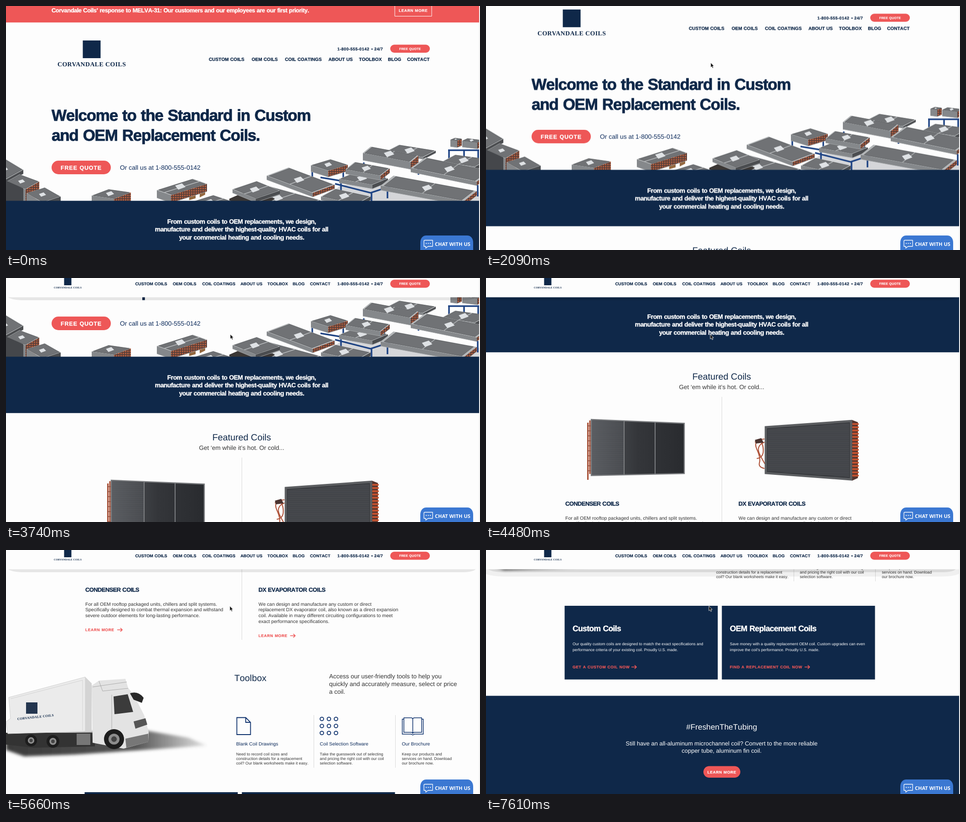
Animation of 1040x538 px, one loop 8000 ms. Source, as an HTML page:

```html
<!DOCTYPE html>
<html lang="en">
<head>
<meta charset="utf-8">
<title>Coil shop scroll</title>
<style>
:root { --navy: #0f2849; --red: #ee5757; --paper: #fdfdfd; }
html, body { margin: 0; width: 100%; height: 100%; overflow: hidden; background: var(--paper); }
svg { display: block; width: 1040px; height: 538px; }
text { font: 10.48px "Liberation Sans", Arial, sans-serif; font-kerning: none; fill: #333; text-rendering: geometricPrecision; white-space: pre; }
.mid { text-anchor: middle; }
.b { font-weight: 700; color: var(--navy); fill: currentColor; stroke: currentColor; stroke-width: .025em; letter-spacing: -.036em; word-spacing: .05em; }
.h1 { font-size: 35px; }
.h2 { font-size: 19.8px; fill: var(--navy); }
.h3 { font-size: 12.8px; }
.h4 { font-size: 17.5px; }
.lead { font-size: 13.5px; }
.call { font-size: 13.9px; fill: #0b2a5b; }
.intro { font-size: 13.8px; }
.note { font-size: 12.9px; }
.nav { font-size: 10.1px; letter-spacing: 0; }
.nav.small { font-size: 9.1px; }
.tel { font-size: 9px; letter-spacing: .43px; }
.btn { font-size: 8.5px; letter-spacing: .6px; }
.btn.tiny { font-size: 7px; letter-spacing: .18px; }
.btn.big { font-size: 12.5px; letter-spacing: .8px; }
.tool { font-size: 10.3px; fill: #0b2a5b; }
.fine { font-size: 8.73px; }
.card { font-size: 8.6px; }
.tag { font-size: 17.3px; }
.cta { font-size: 12.93px; }
.brand { font: 700 13.8px "Liberation Serif", Times, serif; letter-spacing: .033em; fill: var(--navy); }
.chat { font: 700 11px "Open Sans", sans-serif; }
.white { color: #fff; fill: #fff; }
.red { color: var(--red); fill: var(--red); }
.navy { fill: var(--navy); }
.line { fill: none; stroke: #d9d9d9; }
.icon { fill: none; stroke: #0b2f6b; stroke-width: 1.8; }
.arrow { fill: none; stroke: var(--red); stroke-width: 1.6; }
#page, #sticky, #glow, #cursor { animation: 8s step-end infinite; }
#page { animation-name: scroll; }
#sticky { animation-name: stick; }
#glow { animation-name: glow; }
#cursor { animation-name: point; }
@keyframes scroll {
  0% { transform: translateY(0); }
  5.6% { transform: translateY(-4px); }
  7.45% { transform: translateY(-22px); }
  9.2% { transform: translateY(-42px); }
  11.1% { transform: translateY(-54px); }
  20.45% { transform: translateY(-60px); }
  22.3% { transform: translateY(-67px); }
  26.1% { transform: translateY(-68.3px); }
  27.95% { transform: translateY(-83.5px); }
  31.7% { transform: translateY(-85.5px); }
  37.3% { transform: translateY(-87.5px); }
  39.2% { transform: translateY(-130px); }
  41.1% { transform: translateY(-205px); }
  46.7% { transform: translateY(-256px); }
  50.3% { transform: translateY(-300px); }
  55.95% { transform: translateY(-390px); }
  57.8% { transform: translateY(-480px); }
  61.45% { transform: translateY(-552px); }
  65.2% { transform: translateY(-625px); }
  68.8% { transform: translateY(-690px); }
  70.7% { transform: translateY(-800px); }
  76.3% { transform: translateY(-880px); }
  80.1% { transform: translateY(-925px); }
  81.95% { transform: translateY(-939px); }
  85.7% { transform: translateY(-985px); }
  87.6% { transform: translateY(-1090px); }
  93.2% { transform: translateY(-1170px); }
  95.1%, 100% { transform: translateY(-1211px); }
}
@keyframes stick { 0% { visibility: hidden; } 41.1%, 100% { visibility: visible; } }
@keyframes glow { 0% { opacity: 0; } 93.2%, 100% { opacity: 1; } }
@keyframes point {
  0% { transform: translate(493px, 125px); opacity: 0; }
  5.6% { transform: translate(493px, 125px); opacity: 1; }
  37.3% { transform: translate(492px, 124px); opacity: 1; }
  61.45% { transform: translate(491px, 123.5px); opacity: 1; }
  81.95%, 100% { transform: translate(489px, 123.5px); opacity: 1; }
}
</style>
</head>
<body>
<svg viewBox="0 0 1040 538">
  <defs>
    <pattern id="fins" width="4" height="2.6" patternUnits="userSpaceOnUse">
      <path d="M0 1H4" stroke="#686b70" stroke-width=".8"/>
    </pattern>
    <pattern id="tubes" width="5" height="5" patternUnits="userSpaceOnUse">
      <rect width="5" height="5" fill="#5b403a"/><circle cx="2.5" cy="2.5" r="1.7" fill="#b8603f"/>
    </pattern>
    <linearGradient id="road"><stop offset="0" stop-color="#3a3a3a"/><stop offset=".65" stop-color="#555"/><stop offset="1" stop-color="#555" stop-opacity=".15"/></linearGradient>
    <linearGradient id="panel"><stop offset="0" stop-color="#55585c"/><stop offset=".5" stop-color="#34363a"/><stop offset="1" stop-color="#292b2f"/></linearGradient>
    <filter id="soft" x="-10%" y="-50%" width="120%" height="200%"><feGaussianBlur stdDeviation="3"/></filter>
  </defs>
  <g id="page"></g>
  <g id="sticky"></g>
  <g id="chat">
    <path d="M909 540V522Q909 513 914 509 917 506 922 506H1012Q1017 506 1020 509 1025 513 1025 522V540Z" fill="#3b78d2"/>
    <path d="M919 516.5H936V530H926L921 534V530H917V518.5Q917 516.5 919 516.5Z" fill="none" stroke="#fff" stroke-width="1.3" stroke-linejoin="round"/>
    <path d="M921 523.5h2m2.5 0h2m2.5 0h2" stroke="#fff" stroke-width="2"/>
    <text class="chat white" x="941" y="529">CHAT WITH US</text>
  </g>
  <path id="cursor" d="M0 0V10.5L2.4 8.4 4.2 12.2 6 11.3 4.3 7.7H7.4Z" fill="#111" stroke="#fff" stroke-width=".8"/>
  <path d="M1038 0H1040V538H1038Z" fill="#fcfcfc"/>
  <path d="M1038.5 0V538" stroke="#e6e6e6"/>
</svg>
<script>
const NAME = 'CORVANDALE COILS', PHONE = '1-800-555-0142';
const MENU = ['CUSTOM COILS', 'OEM COILS', 'COIL COATINGS', 'ABOUT US', 'TOOLBOX', 'BLOG', 'CONTACT'];

const put = (id, ...parts) => document.getElementById(id).innerHTML = parts.join('');
const at = (y, ...parts) => `<g transform="translate(0 ${y})">${parts.join('')}</g>`;
const path = (d, attrs = '') => `<path d="${d}" ${attrs}/>`;
const fill = (d, color) => path(d, `fill="${color}"`);
const box = (x, y, w, h, cls, r = 0) => `<rect x="${x}" y="${y}" width="${w}" height="${h}" rx="${r}" class="${cls}"/>`;
const disc = (x, y, r, color) => `<circle cx="${x}" cy="${y}" r="${r}" fill="${color}"/>`;
const text = (cls, x, y, str, lead = 0) => str.split('|')
  .map((s, i) => `<text class="${cls}" x="${x}" y="${y + i * lead}">${s}</text>`).join('');
const pill = (x, y, w, h, size, base, label) =>
  box(x, y, w, h, 'red', h / 2) + text(`b btn ${size} mid white`, x + w / 2, base, label);
const link = (x, y, label, tip) =>
  text('b btn red', x, y, label) + path(`M${tip - 11} ${y - 3}H${tip}m-4 -3.8l4 3.8 -4 3.8`, 'class="arrow"');
const menu = (cls, y, xs) => xs.map((x, i) => text('b nav ' + cls, x, y, MENU[i])).join('');
const contact = y => text('b tel', 727, y + 3.5, PHONE) + text('b tel', 801.5, y + 3.5, '•') +
  text('b tel', 808, y + 3.5, '24/7') + pill(843, y - 8.7, 87, 17.6, 'tiny', y + 2.6, 'FREE QUOTE');

// A coil lying flat: left, back and right corners of its top, and its depth.
function slab(lx, ly, bx, by, rx, ry, depth, copper) {
  const fx = lx + rx - bx, fy = ly + ry - by;
  const mx = (lx + rx) / 2, my = (ly + ry) / 2;
  const size = Math.min(1, (rx - lx) / 110);
  const side = copper ? 'url(#tubes)' : '#4b4d50';
  const top = k => 'M' + [[lx, ly], [bx, by], [rx, ry], [fx, fy]]
    .map(([x, y]) => `${mx + (x - mx) * k} ${my + (y - my) * k}`).join('L') + 'Z';
  const bar = rx - lx > 95
    ? path(`M${(bx + rx) / 2} ${(by + ry) / 2}L${(lx + fx) / 2} ${(ly + fy) / 2}`, 'stroke="#b9bcbe" stroke-width="1.5"') : '';
  return fill(`M${lx} ${ly}L${fx} ${fy}v${depth}L${lx} ${ly + depth}Z`, '#85888b') +
    fill(`M${fx} ${fy}L${rx} ${ry}v${depth}L${fx} ${fy + depth}Z`, side) +
    path(`M${lx} ${ly + depth}L${fx} ${fy + depth} ${rx} ${ry + depth}`, 'fill="none" stroke="#a3a6a8"') +
    fill(top(1), '#b4b7b9') + path(top(.93), 'fill="#707275" stroke="#55575a" stroke-width=".8"') + bar +
    path('M-15 -3L0 -8 8 0 -8 6Z', `fill="#dfe2e5" transform="translate(${mx} ${my}) scale(${size})"`);
}

const legs = d => path(d, 'fill="none" stroke="#1f4484" stroke-width="3.5"');
const hero = [
  fill('M690 430L735 395 840 385 1038 410V430Z', '#d5d6d9'),
  legs('M970 318H1040M972 318V350M1005 318V340M1036 318V345'),
  legs('M672 366V398M690 378L738 386M740 362V385M785 345V366M830 365V392M905 345V372'),
  slab(975, 295, 985, 291, 1000, 293, 15, 1),
  slab(1001, 297, 1012, 292, 1045, 296, 14, 1),
  slab(835, 320, 862, 306, 943, 319, 5, 0),
  slab(783, 324, 800, 310, 905, 330, 16, 1),
  slab(955, 344, 985, 328, 1060, 338, 8, 0),
  slab(888, 357, 920, 334, 1065, 364, 9, 1),
  slab(669, 351, 712, 338, 750, 350, 14, 1),
  legs('M722 392L800 412 842 398M735 390V430M802 410V432M837 398V424M722 425L790 420M1035 395V420'),
  slab(731, 381, 765, 367, 838, 380, 9, 0),
  slab(745, 360, 765, 344, 842, 358, 10, 1),
  slab(822, 396, 850, 374, 1033, 408, 10, 1),
  slab(691, 420, 722, 403, 800, 420, 8, 0),
  slab(510, 421, 580, 398, 690, 428, 8, 0),
  fill('M490 425L520 412 590 424 580 432H490Z', '#3b3735'),
  slab(572, 374, 620, 356, 721, 394, 9, 1),
  slab(497, 404, 550, 386, 601, 407, 8, 0),
  slab(400, 434, 455, 417, 500, 432, 8, 0),
  fill('M425 412l12 -5v9l-12 6ZM402 420l14 -4v8l-14 4Z', '#94683f'),
  slab(331, 406, 410, 381, 441, 392, 17, 1),
  slab(188, 418, 225, 404, 274, 411, 22, 1),
  slab(-40, 360, 0, 338, 38, 361, 9, 0),
  slab(0, 388, 30, 371, 73, 387, 32, 1),
  slab(45, 413, 85, 400, 120, 420, 20, 0),
  fill('M0 385L38 402V430H0Z', '#45474b')
];

const rungs = Array.from({ length: 10 }, (_, i) => `M222 ${164 + i * 11}h8`).join('');
const bends = Array.from({ length: 17 }, (_, i) => `M805 ${160 + i * 7.1}h11`).join('');
const condenser = [
  path('M223.5 157V283M228 152V270', 'stroke="#a9533a" stroke-width="3.2"'),
  path(rungs, 'stroke="#8d4a38" stroke-width="1.5"'),
  path('M231 150L435 158.500V269L231 273.500Z', 'fill="url(#panel)" stroke="#77797c" stroke-width="2.5"'),
  fill('M232 152L302 155V271L232 273Z', 'url(#fins)'),
  path('M303 153V272M371 156V271', 'stroke="#85878a" stroke-width="1.8"')
];
const evaporator = [
  path('M611 193Q585 195 594 215T600 245 611 258M611 200Q590 208 602 230T611 246M590 200Q605 190 608 212T594 236',
    'fill="none" stroke="#b0553c" stroke-width="2.2"'),
  fill('M590 195l14 -4 5 10 -17 2Z', '#4a3330'),
  fill('M803 151L816 156V279L803 285Z', '#54352f'),
  path(bends, 'stroke="#c1512f" stroke-width="4.2" stroke-linecap="round"'),
  path('M614 167L801 153.500V282L614 268Z', 'fill="#36383c" stroke="#5c5e61" stroke-width="5"'),
  fill('M618 171L797 158V277L618 264Z', 'url(#fins)')
];

const wheel = (x, y, r) => disc(x, y, r, '#1d1d1d') + disc(x, y, r * .55, '#8d8d8d') + disc(x, y, r * .28, '#444');
const truck = [
  path('M0 270L300 258 400 275 440 292 330 300 150 312 40 316 0 302Z', 'fill="url(#road)" filter="url(#soft)"'),
  fill('M0 264H195V294L60 297 0 290Z', '#333'),
  path('M6 186L174 141V261L4 266 0 240 10 232Z', 'fill="#ebebeb" stroke="#cfcfcf"'),
  path('M10 189L168 148V259', 'fill="none" stroke="#d2d2d2"'),
  fill('M174 141L188 155V262H174Z', '#d4d4d4'),
  fill('M188 160L204 149 262 145 268 165 280 180 303 225 313 262 312 284 258 299 190 286Z', '#e3e3e3'),
  path('M190 163L265 152M232 180V262M204 150L212 172 268 166', 'fill="none" stroke="#aaa"'),
  fill('M236 184L267 179 279 218 238 223Z', '#3b3b3b'), fill('M272 177Q290 171 302 187L298 198 280 191Z', '#292929'),
  fill('M280 239L306 232 310 246 284 255Z', '#555'), fill('M262 277L312 266V284L264 297Z', '#777'),
  fill('M155 266h30v25h-30Z', '#777'),
  wheel(55, 281, 13), wheel(103, 283, 14), wheel(237, 278, 22),
  fill('M44 197h25v25h-25Z', '#24364f'),
  `<text class="brand" style="font-size:7.4px" transform="translate(25 236) rotate(-6)">${NAME}</text>`
];

let dots = '';
for (let i = 0; i < 9; i++)
  dots += `<circle class="icon" cx="${693 + i % 3 * 15.5}" cy="${233.5 + (i / 3 | 0) * 15.5}" r="3.9"/>`;

put('page',
  box(0, -1, 1038, 37.3, 'red'),
  text('b note white', 100, 14, 'Corvandale Coils’ response to MELVA-31: Our customers and our employees are our first priority.'),
  path('M853 -2V22.5H934V-2', 'fill="none" stroke="#fff"'),
  text('b btn mid white', 893.5, 12.5, 'LEARN MORE'),
  box(168.5, 76, 39, 39, 'navy'), text('brand', 113, 132.5, NAME),
  contact(94), menu('', 121, [445, 539, 612, 707.5, 774.5, 838, 880]),
  text('b h1', 100, 253, 'Welcome to the Standard in Custom|and OEM Replacement Coils.', 43.5),
  ...hero,
  pill(100, 341, 130, 30, 'big', 361, 'FREE QUOTE'),
  text('call', 250, 361, 'Or call us at ' + PHONE),
  box(0, 429.5, 1038, 124.3, 'navy'),
  text('b intro mid white', 517, 479.5, 'From custom coils to OEM replacements, we design,|manufacture and deliver the highest-quality HVAC coils for all|your commercial heating and cooling needs.', 17.5),
  text('h2 mid', 517, 613.5, 'Featured Coils'),
  text('lead mid', 517, 635, 'Get ‘em while it’s hot. Or cold...'),
  path('M517.5 652V998', 'class="line"'),
  at(552, ...condenser, ...evaporator,
    text('b h3', 174, 340, 'CONDENSER COILS'),
    text('', 174, 370.5, 'For all OEM rooftop packaged units, chillers and split systems.|Specifically designed to combat thermal expansion and withstand|severe outdoor elements for long-lasting performance.', 12.9),
    link(174, 427, 'LEARN MORE', 255),
    text('b h3', 554, 340, 'DX EVAPORATOR COILS'),
    text('', 554, 370.5, 'We can design and manufacture any custom or direct|replacement DX evaporator coil, also known as a direct expansion|coil. Available in many different circuiting configurations to meet|exact performance specifications.', 12.9),
    link(554, 440, 'LEARN MORE', 634.5)),
  at(939, ...truck,
    text('h2', 501, 149.5, 'Toolbox'),
    text('lead', 709, 144, 'Access our user-friendly tools to help you|quickly and accurately measure, select or price|a coil.', 17),
    path('M506.5 230.5H526L536.5 241V268H506.5ZM526 230.5V241H536.5', 'class="icon"'), dots,
    path('M873 231H889Q892 231 892.5 234 893 231 896 231H912V263H896Q893 263 892.5 266 892 263 889 263H873ZM892.5 234V266M873 234H869.5V267H889L892.5 269 896 267H915.5V234H912', 'class="icon" style="stroke-width:1.5"'),
    path('M675.5 225V341M854.5 225V341', 'class="line"'),
    text('tool', 505, 292, 'Blank Coil Drawings'),
    text('fine', 505, 313.5, 'Need to record coil sizes and|construction details for a replacement|coil? Our blank worksheets make it easy.', 10.3),
    text('tool', 688.5, 292, 'Coil Selection Software'),
    text('fine', 688.5, 313.5, 'Take the guesswork out of selecting|and pricing the right coil with our coil|selection software.', 10.3),
    text('tool', 868.5, 292, 'Our Brochure'),
    text('fine', 868.5, 313.5, 'Keep our products and|services on hand. Download|our brochure now.', 10.3),
    box(172.5, 395, 336, 162.5, 'navy'), box(517.5, 395, 336, 162.5, 'navy'),
    text('b h4 white', 190, 451, 'Custom Coils'),
    text('card white', 190, 481.5, 'Our quality custom coils are designed to match the exact specifications and|performance criteria of your existing coil. Proudly U.S. made.', 13.5),
    link(190, 533, 'GET A CUSTOM COIL NOW', 330),
    text('b h4 white', 535, 451, 'OEM Replacement Coils'),
    text('card white', 535, 481.5, 'Save money with a quality replacement OEM coil. Custom upgrades can even|improve the coil’s performance. Proudly U.S. made.', 13.5),
    link(535, 533, 'FIND A REPLACEMENT COIL NOW', 710)),
  at(1211, box(0, 321.5, 1038, 300, 'navy'),
    text('tag mid white', 517, 396, '#FreshenTheTubing'),
    text('cta mid white', 517, 430.5, 'Still have an all-aluminum microchannel coil? Convert to the more reliable|copper tube, aluminum fin coil.', 16),
    pill(477, 476.5, 81, 25.5, '', 492.5, 'LEARN MORE'))
);

put('sticky',
  path('M0 42V53Q15 58.5 45 58.5H1000Q1030 58 1038 52V42Z', 'id="glow" fill="rgba(0,0,0,.05)"'),
  fill('M4 42Q13 49 40 49H1000Q1025 49 1031 42Z', 'rgba(0,0,0,.09)'),
  fill('M0 0H1038V42.5H0Z', '#fdfdfd'),
  box(127.5, 0, 16, 16, 'navy'),
  `<text class="brand" style="font-size:5.6px" x="105" y="23">${NAME}</text>`,
  menu('small', 16, [283.5, 366, 430.5, 514.5, 573.5, 629, 667]), contact(12.5)
);
</script>
</body>
</html>
```
